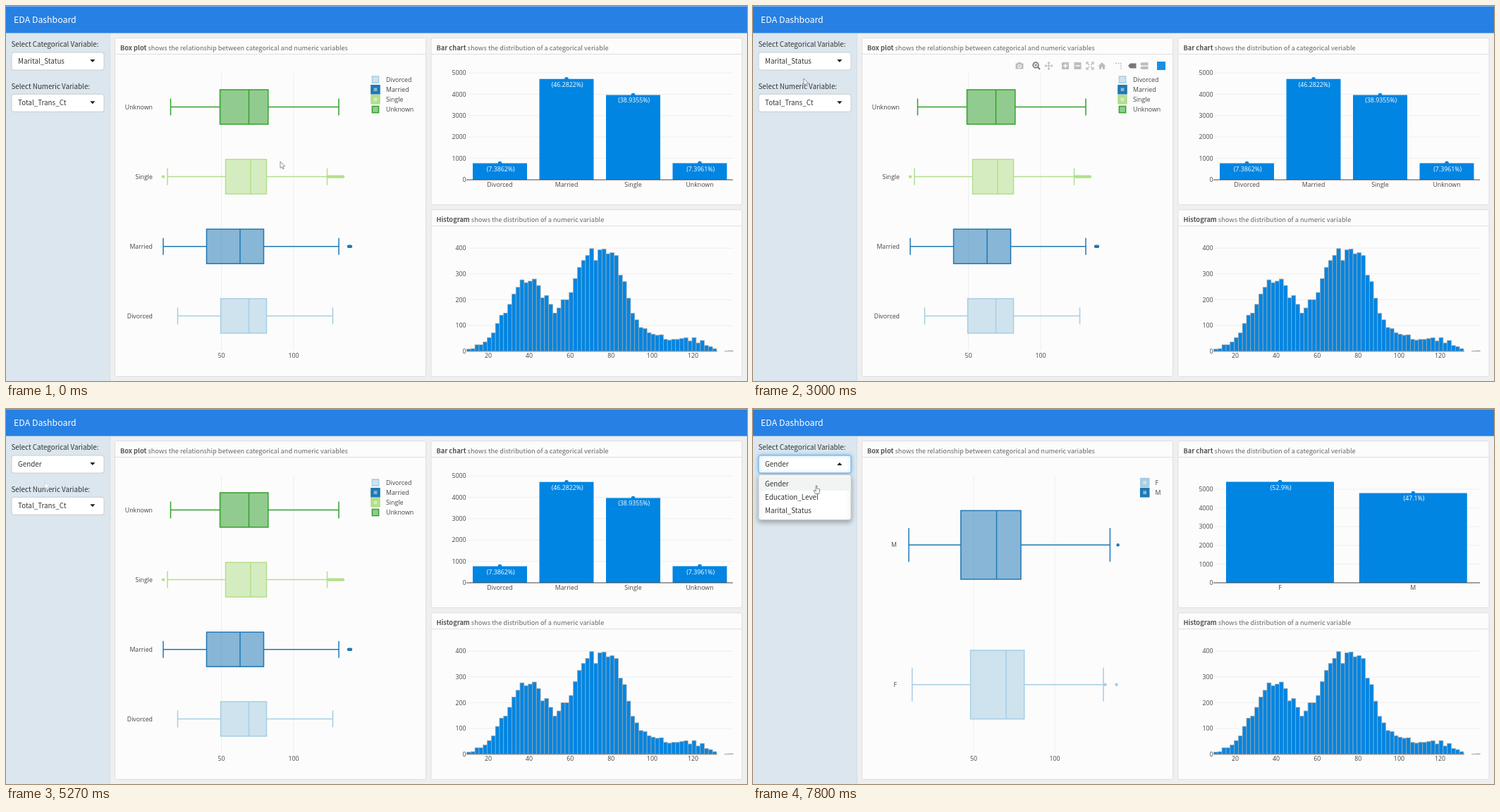
An HTML page with a canvas for the animation above (8 s loop, 1051 by 533 pixels).

```html
<!DOCTYPE html>
<html lang="en">
<head>
<meta charset="utf-8">
<title>EDA Dashboard</title>
<style>
  html, body { margin: 0; width: 100%; height: 100%; overflow: hidden; background: #efefef; }
  canvas { display: block; width: 1051px; height: 533px; }
</style>
</head>
<body>
<canvas id="stage"></canvas>
<script>
const W = 1051, H = 533, LOOP = 8000;
const canvas = document.getElementById('stage');
const ratio = window.devicePixelRatio || 1;
canvas.width = W * ratio;
canvas.height = H * ratio;
const c = canvas.getContext('2d');

const UI = '"Noto Sans CJK SC", "Noto Sans CJK JP", "Noto Sans CJK", "Noto Sans", sans-serif';
const PLOT = '8.8px "Open Sans", "Noto Sans", sans-serif';
const HOVER = '9.5px "Liberation Sans", Arial, sans-serif';
const BODY = '9.82px ' + UI;
const BLUE = '#0085e2';
const PALE = [166, 206, 227], DEEP = [31, 120, 180], LIME = [178, 223, 138], GREEN = [51, 160, 44];
const rgb = (k, a = 1) => `rgba(${k.join(',')},${a})`;

// Poses hold until the next one starts.
const POSES = [
  { at: 0, cur: 'arrow', x: 389, y: 221 },
  { at: 330, cur: 'cross', x: 373, y: 213, bar: 1, hover: 1 },
  { at: 670, cur: 'cross', x: 355, y: 205, bar: 1, hover: 1 },
  { at: 1070, cur: 'cross', x: 345, y: 200, bar: 1, hover: 1 },
  { at: 1530, cur: 'cross', x: 343, y: 201, bar: 1, hover: 1 },
  { at: 1930, cur: 'cross', x: 341, y: 202, bar: 1, hover: 1 },
  { at: 2270, cur: 'cross', x: 338, y: 202, bar: 1, hover: 1 },
  { at: 3000, cur: 'arrow', x: 72, y: 103, bar: 1 },
  { at: 3330, cur: 'beam', x: 55, y: 80 },
  { at: 3670, cur: 'beam', x: 53, y: 78, open: 1, mark: 2, caret: 1 },
  { at: 3870, cur: 'hand', x: 53, y: 100, open: 1, mark: 0, caret: 1 },
  { at: 4270, cur: 'hand', x: 55, y: 104, open: 1, mark: 0 },
  { at: 4670, cur: 'hand', x: 56, y: 105, open: 1, mark: 0, caret: 1 },
  { at: 5000, cur: 'hand', x: 56, y: 105, gender: 1 },
  { at: 5270, cur: 'arrow', x: 55, y: 104, faint: 1, gender: 1 },
  { at: 5530, cur: 'arrow', x: 55, y: 104, faint: 1, gender: 1, fresh: 1 },
  { at: 6330, cur: 'arrow', x: 56, y: 102, gender: 1, fresh: 1 },
  { at: 6730, cur: 'arrow', x: 58, y: 95, gender: 1, fresh: 1 },
  { at: 7070, cur: 'beam', x: 61, y: 80, gender: 1, fresh: 1 },
  { at: 7400, cur: 'beam', x: 62, y: 79, gender: 1, fresh: 1, open: 1, mark: 0, caret: 1 },
  { at: 7800, cur: 'hand', x: 90, y: 109, gender: 1, fresh: 1, open: 1, mark: 0 }
];

// Box rows: name, colour, centre, low, q1, median, q3, high, outlier spans
const MARITAL = {
  half: 24.5, cap: 12, label: 208, ticks: [305.5, 408], swatch: 524, text: 539,
  rows: [
    ['Divorced', PALE, 440.5, 243.5, 304.5, 344.5, 369.5, 463.5, []],
    ['Married', DEEP, 341.7, 223, 284.5, 332, 365.5, 472, [[486, 489]]],
    ['Single', LIME, 242.6, 229, 311.5, 347, 369.5, 455.5, [[223, 223], [457, 478]]],
    ['Unknown', GREEN, 143.5, 233.5, 303.5, 344.5, 371.8, 472, []]
  ],
  step: 30.4, barWidth: 77,
  bars: [['Divorced', 700.5, 223.5, '7.3862', 231.5], ['Married', 795, 103.7, '46.2822', 111.5],
    ['Single', 889.5, 126.5, '38.9355', 134], ['Unknown', 984, 223.4, '7.3961', 231.5]]
};
const GENDER = {
  half: 48.8, cap: 24, label: 204, ticks: [313, 428], swatch: 555.7, text: 570.5,
  rows: [
    ['F', PALE, 391.8, 225.7, 308.5, 359, 384.7, 497, [[499.5, 499.5], [515.5, 515.5]]],
    ['M', DEEP, 193.2, 221, 294.8, 345.5, 380, 506.4, [[517.6, 517.6]]]
  ],
  step: 26.6, barWidth: 153,
  bars: [['F', 747.5, 103.5, '52.9', 111.5], ['M', 936.3, 119.5, '47.1', 127]]
};
const COUNTS = [8, 10, 25, 25, 36, 53, 71, 108, 140, 148, 182, 222, 248, 277, 266, 272, 280, 255,
  207, 216, 182, 148, 168, 200, 200, 228, 282, 325, 352, 372, 398, 352, 393, 396, 378, 382, 371,
  295, 270, 206, 147, 122, 92, 88, 72, 66, 62, 64, 46, 43, 46, 46, 49, 52, 40, 53, 32, 42, 22,
  18, 10, 0, 0, 1, 2];

function rect(x, y, w, h, fill) {
  c.fillStyle = fill;
  c.fillRect(x, y, w, h);
}

function line(color, width, ...pts) {
  c.strokeStyle = color;
  c.lineWidth = width;
  c.beginPath();
  for (let i = 0; i < pts.length; i += 2) c.lineTo(pts[i], pts[i + 1]);
  c.stroke();
}

function poly(fill, ...pts) {
  c.fillStyle = fill;
  c.beginPath();
  for (let i = 0; i < pts.length; i += 2) c.lineTo(pts[i], pts[i + 1]);
  c.closePath();
  c.fill();
}

function dot(x, y, r, fill) {
  c.fillStyle = fill;
  c.beginPath();
  c.arc(x, y, r, 0, 7);
  c.fill();
}

function text(s, x, y, font, fill, align = 'left') {
  c.font = font;
  c.fillStyle = fill;
  c.textAlign = align;
  c.fillText(s, x, y);
}

const plotText = (s, x, y, align, fill = '#444') => text(s, x, y + 3.2, PLOT, fill, align);

function panel(x, y, w, h, r, fill, stroke) {
  c.beginPath();
  c.roundRect(x, y, w, h, r);
  c.fillStyle = fill;
  c.fill();
  c.strokeStyle = stroke;
  c.lineWidth = 1;
  c.stroke();
}

function card(x, y, w, h, head, rest) {
  panel(x, y, w, h, 2, '#fcfcfc', '#dedede');
  line('#dedede', 1, x, y + 23, x + w, y + 23);
  const font = '9.24px ' + UI;
  text(head, x + 7.5, y + 17, 'bold ' + font, '#555');
  const gap = c.measureText(head + ' ').width;
  text(rest, x + 7.5 + gap, y + 17, font, '#666');
}

function select(y, value, open) {
  if (open) {
    c.save();
    c.shadowColor = 'rgba(70,160,235,.7)';
    c.shadowBlur = 5 * ratio;
    panel(8, y, 131, 25, 3, '#fff', '#66afe9');
    c.restore();
  } else {
    panel(8, y, 131, 25, 3, '#fff', '#ccc');
  }
  text(value, 17, y + 16, BODY, '#333');
  const d = open ? -1 : 1, m = y + 12;
  poly('#222', 119.2, m - 2 * d, 126.4, m - 2 * d, 122.8, m + 2 * d);
}

function menu(mark) {
  c.save();
  c.shadowColor = 'rgba(0,0,0,.3)';
  c.shadowBlur = 7 * ratio;
  c.shadowOffsetY = 3 * ratio;
  panel(8, 93.5, 131, 64, 3, '#fff', '#ccc');
  c.restore();
  rect(8.5, 97 + mark * 19, 130, 19, '#f2f3f3');
  ['Gender', 'Education_Level', 'Marital_Status'].forEach((s, i) =>
    text(s, 17, 110.3 + i * 19, BODY, '#333'));
}

function sidebar(p) {
  rect(0, 39, 148, H - 39, '#dbe6ee');
  rect(147, 39, 1, H - 39, '#d3dee7');
  const value = p.gender ? 'Gender' : 'Marital_Status';
  text('Select Categorical Variable:', 7.5, 58.3, BODY, '#333');
  text('Select Numeric Variable:', 7.5, 117.8, BODY, '#333');
  select(66, value, p.open);
  select(125.3, 'Total_Trans_Ct', false);
  if (p.caret) {
    c.font = BODY;
    const x = 17.8 + c.measureText(value).width;
    line('#333', 0.9, x, 72, x, 84);
  }
  if (p.open) menu(p.mark);
}

function boxPlot(d) {
  d.ticks.forEach((x, i) => {
    line('#eee', 1, x, 95, x, 490);
    plotText(50 + 50 * i, x, 497, 'center');
  });
  d.rows.forEach(([name, k, y, low, q1, med, q3, high, extra], i) => {
    const ink = rgb(k), wid = 1.5;
    c.fillStyle = rgb(k, 0.52);
    c.fillRect(q1, y - d.half, q3 - q1, d.half * 2);
    c.strokeStyle = ink;
    c.lineWidth = wid;
    c.strokeRect(q1, y - d.half, q3 - q1, d.half * 2);
    line(ink, wid, med, y - d.half, med, y + d.half);
    line(ink, wid, low, y, q1, y);
    line(ink, wid, q3, y, high, y);
    for (const x of [low, high]) line(ink, wid, x, y - d.cap, x, y + d.cap);
    for (const [a, b] of extra) {
      c.lineCap = 'round';
      line(ink, 4.4, a, y, b + 0.01, y);
      c.lineCap = 'butt';
    }
    plotText(name, d.label, y, 'right');
    const ly = 104.6 + i * 14.15;
    c.fillStyle = rgb(k, 0.52);
    c.fillRect(d.swatch - 4.6, ly - 4.6, 9.2, 9.2);
    c.strokeStyle = ink;
    c.strokeRect(d.swatch - 4.6, ly - 4.6, 9.2, 9.2);
    plotText(name, d.text, ly + 0.2, 'left');
  });
}

function barChart(d) {
  for (let i = 0; i < 6; i++) {
    const y = 247 - i * d.step;
    if (i) line('#eee', 1, 655, y, 1031, y);
    plotText(i * 1000, 652.5, y, 'right');
  }
  for (const [name, x, top, pct, ty] of d.bars) {
    rect(x - d.barWidth / 2, top, d.barWidth, 247 - top, BLUE);
    dot(x, top, 2.8, BLUE);
    plotText(`(${pct}%)`, x + 1.2, ty, 'center', '#fff');
    plotText(name, x, 253.7, 'center');
  }
  line('#444', 1, 653, 247, 1031, 247);
}

function histogram() {
  for (let i = 0; i < 5; i++) {
    const y = 490.7 - i * 36.65;
    if (i) line('#eee', 1, 655, y, 1031, y);
    plotText(i * 100, 652.5, y, 'right');
  }
  c.lineWidth = 0.75;
  c.strokeStyle = '#a9a9a9';
  COUNTS.forEach((n, i) => {
    if (!n) return;
    const h = n * 0.3665, x = 653.5 + i * 5.81;
    rect(x, 490.7 - h, 5.81, h, BLUE);
    c.strokeRect(x, 490.7 - h, 5.81, h);
  });
  line('#777', 0.8, 653, 490.9, 1009, 490.9);
  for (let i = 1; i < 7; i++) plotText(i * 20, 625.9 + i * 58.1, 497.2, 'center');
}

function tag(s, x, shift, name) {
  c.save();
  c.translate(x, 267);
  c.rotate(Math.PI / 3);
  c.font = HOVER;
  const w = c.measureText(s).width + 4.4, a = 4.4, h = 7;
  c.beginPath();
  [[0, 0], [a, shift - a], [a, shift - h], [a + w, shift - h], [a + w, shift + h],
    [a, shift + h], [a, shift + a]].forEach(q => c.lineTo(...q));
  c.closePath();
  c.fillStyle = rgb(LIME);
  c.fill();
  c.strokeStyle = '#444';
  c.lineWidth = 0.8;
  c.stroke();
  text(s, a + 2.2, shift + 3.3, HOVER, '#444');
  if (name) text(name, a + w + 3, shift + 3.3, HOVER, rgb(LIME));
  c.restore();
}

function hoverTags() {
  const stats = [['min: 10', 223, 6], ['lower fence: 13', 229, -6], ['q1: 53', 311.5, 0],
    ['median: 70', 347, 0, 'Single'], ['q3: 81', 369.5, 0], ['upper fence: 123', 455.5, 0],
    ['max: 134', 478, 0]];
  for (const [s, x, shift, name] of stats) tag(`(${s}, Single)`, x, shift, name);
}

function modeBar() {
  const g = '#bdbdbd', d = '#777', y = 85;
  // camera
  rect(372.5, 81.5, 11, 8, g);
  rect(375.5, 80, 5, 2, g);
  dot(378, 85.5, 2.6, '#fcfcfc');
  dot(378, 85.5, 1.4, g);
  // zoom
  c.strokeStyle = d;
  c.lineWidth = 1.8;
  c.beginPath();
  c.arc(401, 84, 3.8, 0, 7);
  c.stroke();
  line(d, 2, 403.8, 86.8, 407, 90);
  line(d, 1, 399, 84, 403, 84);
  line(d, 1, 401, 82, 401, 86);
  // pan
  line(g, 1.2, 414, y, 425, y);
  line(g, 1.2, 419.5, 79.5, 419.5, 90.5);
  for (let i = 0; i < 4; i++) {
    c.save();
    c.translate(419.5, y);
    c.rotate(i * Math.PI / 2);
    poly(g, 6, 0, 3.5, -2.3, 3.5, 2.3);
    c.restore();
  }
  // zoom in, zoom out
  for (const x of [443, 460.5]) {
    rect(x - 5, 80, 10, 10, g);
    line('#fcfcfc', 1.6, x - 3, y, x + 3, y);
  }
  line('#fcfcfc', 1.6, 443, 82, 443, 88);
  // autoscale
  for (const sx of [-1, 1]) for (const sy of [-1, 1]) {
    line(g, 1.3, 478 + sx * 5, y + sy * 2, 478 + sx * 5, y + sy * 5, 478 + sx * 2, y + sy * 5);
    line(g, 1.3, 478 + sx, y + sy, 478 + sx * 4, y + sy * 4);
  }
  // home
  poly(g, 489.5, 85.5, 495, 80, 500.5, 85.5);
  rect(491, 85, 3, 5, g);
  rect(496, 85, 3, 5, g);
  rect(491, 85, 8, 2, g);
  // spikes
  c.setLineDash([2, 1.5]);
  line(g, 1.4, 514, 81.5, 522, 81.5, 522, 90);
  c.setLineDash([]);
  // closest, compare
  poly(d, 532, y, 535, 81.5, 543.5, 81.5, 543.5, 88.5, 535, 88.5);
  for (const t of [80.3, 85.8]) poly(g, 549, t + 2.1, 551, t, 560.5, t, 560.5, t + 4.2, 551, t + 4.2);
  rect(573, 79, 12, 12, '#1a8fe3');
}

function outline(pts, x, y, ink) {
  c.beginPath();
  for (const [a, b] of pts) c.lineTo(x + a, y + b);
  c.closePath();
  c.fillStyle = '#fff';
  c.fill();
  c.strokeStyle = ink;
  c.lineWidth = 0.8;
  c.lineJoin = 'round';
  c.stroke();
  c.lineJoin = 'miter';
}

function cursor({ cur, x, y, faint }) {
  if (cur === 'arrow') {
    outline([[0, 0], [0, 9.5], [2.2, 7.5], [3.6, 10.8], [5.2, 10.1], [3.8, 7], [6.6, 6.8]],
      x, y, faint ? '#c3cbd2' : '#777');
  } else if (cur === 'cross') {
    line('#111', 1.3, x - 5.5, y + 0.5, x + 6, y + 0.5);
    line('#111', 1.3, x + 0.3, y - 5, x + 0.3, y + 6);
  } else if (cur === 'beam') {
    line('#222', 1, x - 2.5, y - 5, x + 2.5, y - 5);
    line('#222', 1, x, y - 5, x, y + 5);
    line('#222', 1, x - 2.5, y + 5, x + 2.5, y + 5);
  } else {
    outline([[-0.8, 0], [0.8, 0], [0.8, 4], [4.6, 5], [4.6, 8], [3.6, 11.5], [-1.4, 11.5],
      [-4, 7], [-3, 6.2], [-0.8, 8]], x, y, '#666');
  }
}

function draw(ms) {
  const p = POSES.findLast(q => q.at <= ms);
  const data = p.fresh ? GENDER : MARITAL;
  c.setTransform(ratio, 0, 0, ratio, 0, 0);
  rect(0, 0, W, H, '#efefef');
  rect(0, 0, W, 38.5, '#2780e3');
  rect(0, 0, W, 1, '#7fb2ee');
  text('EDA Dashboard', 11, 24, '12.35px ' + UI, '#fff');
  sidebar(p);
  card(154.5, 45.5, 441, 481, 'Box plot', 'shows the relationship between categorical and numeric variables');
  card(603, 45.5, 441, 237, 'Bar chart', 'shows the distribution of a categorical veriable');
  card(603, 289.7, 441, 237, 'Histogram', 'shows the distribution of a numeric variable');
  boxPlot(data);
  barChart(data);
  histogram();
  if (p.bar) modeBar();
  if (p.hover) hoverTags();
  cursor(p);
}

const start = performance.now();
function tick() {
  draw((performance.now() - start) % LOOP);
  requestAnimationFrame(tick);
}
tick();
</script>
</body>
</html>
```
